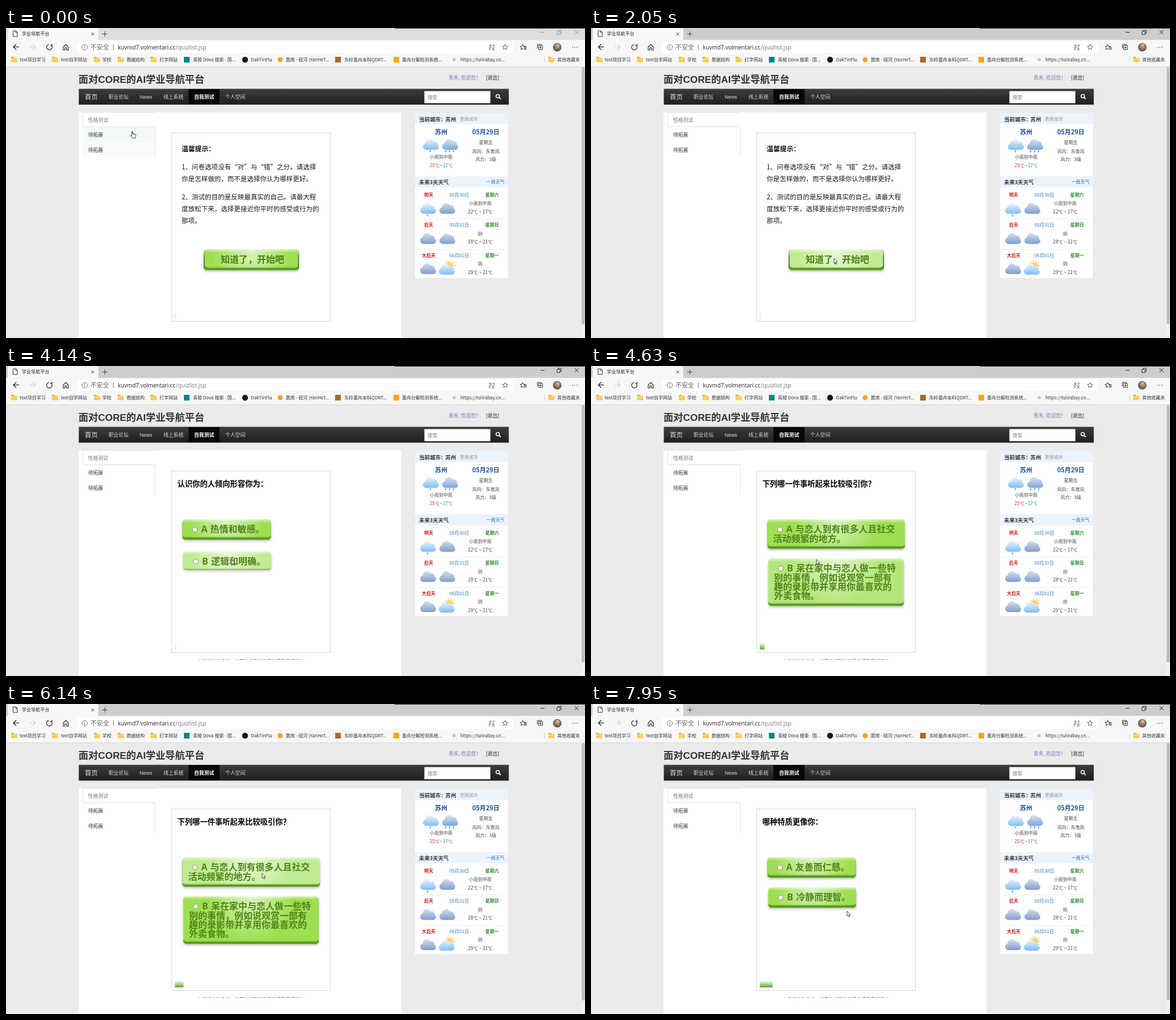
These frames come from a looping animation (1022 by 548 pixels, 7990 ms). An HTML page with a canvas:

```html
<!DOCTYPE html>
<html lang="zh-CN">
<head>
<meta charset="utf-8">
<title>学业导航平台</title>
<style>
html, body { margin: 0; width: 100%; height: 100%; overflow: hidden; background: #ebebeb; }
canvas { display: block; width: 1022px; height: 548px; }
</style>
</head>
<body>
<canvas id="stage" width="1022" height="548"></canvas>
<script>
const LOOP = 7990;
const CJK = '"Noto Sans CJK SC", sans-serif';
const UI = '"Open Sans", "Noto Sans CJK SC", sans-serif';
const ARIAL = '"Liberation Sans", "Noto Sans CJK SC", sans-serif';
const screen = document.getElementById('stage').getContext('2d');
let g = screen;

// ---- drawing helpers ----
function rect(x, y, w, h, fill) {
  g.fillStyle = fill;
  g.fillRect(x, y, w, h);
}
function frame(x, y, w, h, color) {
  g.strokeStyle = color;
  g.lineWidth = 1;
  g.strokeRect(x + .5, y + .5, w - 1, h - 1);
}
function round(x, y, w, h, r, fill) {
  g.beginPath();
  g.roundRect(x, y, w, h, r);
  g.fillStyle = fill;
  g.fill();
}
function disc(x, y, r, fill, stroke, width = 1) {
  g.beginPath();
  g.arc(x, y, r, 0, Math.PI * 2);
  if (fill) { g.fillStyle = fill; g.fill(); }
  if (stroke) { g.strokeStyle = stroke; g.lineWidth = width; g.stroke(); }
}
function path(x, y, pts, stroke, width = 1, fill) {
  g.beginPath();
  for (let i = 0; i < pts.length; i += 2) g.lineTo(x + pts[i], y + pts[i + 1]);
  if (fill) { g.closePath(); g.fillStyle = fill; g.fill(); }
  g.strokeStyle = stroke;
  g.lineWidth = width;
  g.stroke();
}
function shade(y0, y1, ...colors) {
  const grad = g.createLinearGradient(0, y0, 0, y1);
  colors.forEach((c, i) => grad.addColorStop(i / (colors.length - 1), c));
  return grad;
}
// y is the visual middle of the line
function text(s, x, y, size, color, { bold = false, align = 'left', font = CJK } = {}) {
  g.font = `${bold ? 'bold ' : ''}${size}px ${font}`;
  g.textAlign = align;
  g.fillStyle = color;
  g.fillText(s, x, y + size * .37);
}
const bold = { bold: true };
const center = { align: 'center' };
const boldCenter = { bold: true, align: 'center' };

// ---- browser window ----
function star(x, y, r, color) {
  const pts = [];
  for (let i = 0; i <= 10; i++) {
    const a = i * Math.PI / 5 - Math.PI / 2, q = i % 2 ? r * .45 : r;
    pts.push(Math.cos(a) * q, Math.sin(a) * q);
  }
  path(x, y, pts, color, .9);
}
function folder(x) {
  round(x - 5, 51, 5, 4, 1, '#d9a520');
  round(x - 5, 52.5, 11, 8, 1, '#f5cc55');
  rect(x - 5, 54.5, 11, 1, '#fbe39b');
}
function drawTabs(active) {
  rect(0, 0, 1022, 21, active ? '#cdcdcd' : '#dedede');
  rect(686, 0, 336, 1, '#222');
  round(3, 0, 160, 22, [3, 3, 0, 0], '#f7f7f7');
  path(16, 10, [-3.5, -5, 1.5, -5, 4, -2.5, 4, 5, -3.5, 5, -3.5, -5], '#333');
  path(16, 10, [1.2, -5, 1.2, -2, 4, -2], '#333');
  text('学业导航平台', 28, 10.5, 8.1, '#222');
  path(153, 10.5, [-2.5, -2.5, 2.5, 2.5], '#333');
  path(153, 10.5, [-2.5, 2.5, 2.5, -2.5], '#333');
  path(174.5, 10.5, [-4.5, 0, 4.5, 0], '#444');
  path(174.5, 10.5, [0, -4.5, 0, 4.5], '#444');

  const c = active ? '#222' : '#999';
  path(947, 7.5, [-3.5, 0, 3.5, 0], c);
  path(976, 8, [-3.5, -2, 2, -2, 2, 3.5, -3.5, 3.5, -3.5, -2], c, .9);
  path(976, 8, [-1.5, -2, -1.5, -4, 4, -4, 4, 1.5, 2, 1.5], c, .9);
  path(1007, 7.5, [-3.5, -3.5, 3.5, 3.5], c);
  path(1007, 7.5, [-3.5, 3.5, 3.5, -3.5], c);
}
function drawToolbar() {
  rect(0, 21, 1022, 47, '#f7f7f7');
  round(125, 24, 770, 20, 3, '#fff');
  for (const [x, dir, c] of [[18, 1, '#222'], [47, -1, '#d2d2d2']]) {
    path(x, 33.5, [-5 * dir, 0, 5 * dir, 0], c, 1.2);
    path(x, 33.5, [0, -5, -5 * dir, 0, 0, 5], c, 1.2);
  }
  g.beginPath();
  g.arc(76.5, 34, 4.8, -.6, 4.6);
  g.strokeStyle = '#222';
  g.lineWidth = 1.2;
  g.stroke();
  path(76.5, 34, [1.5, -3.2, 4.6, -3.2, 4.6, -6], '#222', 1.2);
  path(105.5, 34, [-4.5, -.5, 0, -5, 4.5, -.5, 4.5, 5, 1.5, 5, 1.5, 1, -1.5, 1, -1.5, 5, -4.5, 5, -4.5, -.5], '#222', 1.1);
  disc(139, 34, 4.7, null, '#666', .9);
  rect(138.5, 33, 1, 3.5, '#666');
  rect(138.5, 31, 1, 1, '#666');
  text('不安全', 149, 34, 11, '#666');
  rect(189, 29, 1, 10, '#777');
  text('kuvmd7.volmentari.cc', 197.5, 34, 9.9, '#222', { font: UI });
  text('/quizlist.jsp', 299.5, 34, 10.3, '#777', { font: UI });
  text('文', 852, 31.5, 6, '#333');
  text('a', 859, 31, 6, '#333');
  text('a', 852, 37, 6, '#333');
  text('文', 857, 37, 6, '#333');
  star(881, 34, 5, '#555');
  star(912, 34, 5, '#222');
  rect(913, 33, 6, 5, '#f7f7f7');
  for (let i = 0; i < 3; i++) rect(914, 33 + i * 2, 5, 1, '#333');
  path(942, 33, [-4, 3, -4, -4, 3, -4, 3, -2], '#333');
  path(942, 33, [-2, -2, 5, -2, 5, 5, -2, 5, -2, -2], '#333');
  path(943.5, 34.5, [-2, 0, 2, 0], '#333');
  path(943.5, 34.5, [0, -2, 0, 2], '#333');
  const skin = g.createRadialGradient(974, 30, 1, 973, 34, 8);
  skin.addColorStop(0, '#d8b79c');
  skin.addColorStop(1, '#594238');
  disc(973, 34, 7.5, skin);
  for (let i = -1; i < 2; i++) disc(1004 + i * 4, 34, .8, '#333');
}
function drawBookmarks() {
  [14, 86, 160, 202, 260, 962].forEach(folder);
  const marks = [
    [24, 'text项目学习'], [97, 'text自学网站'], [170, '学校'], [213, '数据结构'], [271, '打字网站'],
    [330, '青梭 Dova 搜索 - 国...'], [432, 'OakTinFlu'], [494, '题库 - 砚河 (YanHeT...'],
    [597, '东岭墨舟本科QDRT...'], [699, '墨舟分解检测系统...'], [802, 'https://tulirabay.cn...'], [973, '其他收藏夹']
  ];
  for (const [x, s] of marks) text(s, x, 56.5, 8, '#333');
  rect(314, 51, 10, 10, '#0c8484');
  disc(422, 56, 5.2, '#191717');
  disc(484, 56, 4.5, '#efa32c');
  rect(581, 51, 10, 10, '#a8672c');
  rect(684, 51, 10, 10, '#f6a609');
  disc(791, 56, 3, '#e5bfa0');
  rect(950, 51, 1, 10, '#ccc');
}

// ---- page ----
function drawPage() {
  rect(0, 68, 1022, 480, '#ebebeb');
  rect(0, 68, 1022, 1, '#d8d8d8');
  rect(1015, 69, 7, 479, '#f1f1f1');
  round(1016, 69, 5.5, 455, 2, '#bdbdbd');
  text('面对CORE的AI学业导航平台', 128, 91, 17.25, '#333', { bold: true, font: ARIAL });
  text('青禾, 欢迎您！', 781, 88, 8.8, '#8272b4');
  text('[退出]', 847, 88, 8.8, '#222');

  rect(128.5, 107.5, 759, 28, shade(108, 135, '#3c3c3c', '#1f1f1f'));
  rect(322, 108, 55, 27, '#080808');
  text('首页', 139, 121.5, 11.5, '#e2e2e2');
  const items = [[181, '职业论坛'], [236, 'News'], [278, '线上系统'], [387, '个人空间']];
  for (const [x, s] of items) text(s, x, 121.5, 8.8, '#ddd', { font: ARIAL });
  text('自我测试', 332, 121.5, 8.8, '#fff', bold);
  rect(738.5, 111.5, 116.5, 21.5, '#fff');
  text('搜索', 744, 122.5, 8.8, '#888');
  disc(868, 120.5, 3, null, '#fff', 1.5);
  path(870, 122.5, [0, 0, 3.2, 3.2], '#fff', 1.8);

  rect(128, 149, 570, 399, '#fff');
}
function cloud(x, y, top, bottom) {
  g.fillStyle = shade(y - 10, y + 10, top, bottom);
  g.beginPath();
  for (const [dx, dy, r] of [[-8, 3.5, 6], [-2, -2, 7.5], [6, 0, 6], [9, 4.5, 5]]) {
    g.moveTo(x + dx + r, y + dy);
    g.arc(x + dx, y + dy, r, 0, Math.PI * 2);
  }
  g.rect(x - 8, y + 1, 17, 8.5);
  g.fill();
}
const rainy = (x, y) => cloud(x, y, '#eef7fe', '#7dbbf5');
const grey = (x, y) => cloud(x, y, '#d6dfef', '#7f9bcb');
function drop(x, y) {
  g.beginPath();
  g.ellipse(x, y, 1.3, 2, .3, 0, Math.PI * 2);
  g.fillStyle = '#6fb1ea';
  g.fill();
}
function drawWeather() {
  rect(721, 149, 166, 294, '#fff');
  frame(721, 149, 166, 294, '#e6ebf1');
  rect(722, 150, 164, 20, '#edf3fb');
  rect(722, 262, 164, 20, '#edf3fb');
  text('当前城市：', 729, 161, 9.6, '#333', bold);
  text('苏州', 775.5, 161, 9.5, '#333', bold);
  text('更换城市', 801, 161, 8, '#999');
  text('苏州', 768, 184, 11, '#1a5296', boldCenter);
  text('05月29日', 847, 184, 11, '#1a5296', boldCenter);
  text('星期五', 847, 202, 8, '#444', center);
  text('风向：东南风', 847, 218, 8, '#444', center);
  text('风力：3级', 847, 232, 8, '#444', center);
  rainy(750, 206);
  cloud(784, 206, '#d8e3f1', '#7ba4d8');
  [749, 776, 783, 790].forEach(x => drop(x, 218));
  text('小雨到中雨', 768, 228.5, 8, '#444', center);
  text('25℃', 747.5, 242.5, 8.3, '#e02f2f');
  text('~', 768, 242.5, 8.3, '#444', center);
  text('17℃', 788.5, 242.5, 8.3, '#2b86cf', { align: 'right' });
  text('未来3天天气', 729, 272.5, 9.4, '#333', bold);
  text('一周天气', 848, 272.5, 8, '#1a6fbf');

  const days = [
    ['明天', '05月30日', '星期六', '小雨到中雨', '22℃ ~ 17℃'],
    ['后天', '05月31日', '星期日', '阴', '28℃ ~ 21℃'],
    ['大后天', '06月01日', '星期一', '阴', '29℃ ~ 21℃']
  ];
  days.forEach(([name, date, week, sky, temp], i) => {
    const y = 295 + i * 53.3;
    text(name, 746, y, 8, '#d01818', boldCenter);
    text(date, 800, y, 8.2, '#2a78c0', center);
    text(week, 858, y, 8, '#2b8a2b', boldCenter);
    text(sky, 837, y + 15.5, 8, '#444', center);
    text(temp, 837, y + 30, 8.3, '#444', center);
    if (i) rect(727, Math.round(y - 11), 154, 1, '#ececec');
    (i ? grey : rainy)(745, y + 24);
    if (i < 2) grey(779, y + 24);
  });
  drop(744, 331.5);
  for (let i = 0; i < 10; i++) {
    const a = i * Math.PI / 5, c = Math.cos(a), s = Math.sin(a);
    path(783, 420, [c * 7, s * 7, c * 10, s * 10], '#f8cd62', 1.5);
  }
  disc(783, 420, 6.5, '#fbd36c');
  rainy(778, 426.5);
}

// ---- quiz content ----
const questions = [
  { start: 2210, title: '认识你的人倾向形容你为：', a: ['热情和敏感。'], b: ['逻辑和明确。'] },
  { start: 4510, title: '下列哪一件事听起来比较吸引你？',
    a: ['与恋人到有很多人且社交', '活动频繁的地方。'],
    b: ['呆在家中与恋人做一些特', '别的事情，例如说观赏一部有', '趣的录影带并享用你最喜欢的', '外卖食物。'] },
  { start: 6190, title: '你倾向通过以下哪种方式收集信息：',
    a: ['你对有可能发生之事的想', '像和期望。'], b: ['你对目前状况的实际认', '知。'] },
  { start: 7700, title: '哪种特质更像你：', a: ['友善而仁慈。'], b: ['冷静而理智。'] }
];
const presses = [
  { key: 'B', from: 4100, to: 4230 },
  { key: 'A', from: 5820, to: 5950 },
  { key: 'B', from: 7330, to: 7460 }
];
const fills = [[4180, 4400], [5820, 6030], [7330, 7540]];

// time, x, y of the pointer tip
const route = [
  [40, 222, 183], [610, 300, 300], [900, 300, 300], [1680, 429, 407],
  [2620, 429, 407], [2800, 415, 362], [3060, 404, 318], [3200, 396, 308], [3240, 394, 282],
  [3400, 396, 240], [3520, 397, 224], [3690, 397, 224], [3980, 398, 342],
  [4960, 398, 342], [5400, 452, 299], [6200, 452, 299], [6560, 452, 368],
  [7740, 452, 368], [7940, 452, 366]
];
const clamp = v => Math.max(0, Math.min(1, v));
function pointer(t) {
  let i = 0;
  while (i < route.length - 2 && t > route[i + 1][0]) i++;
  const [t0, x0, y0] = route[i], [t1, x1, y1] = route[i + 1];
  const k = clamp((t - t0) / (t1 - t0));
  return [x0 + (x1 - x0) * k, y0 + (y1 - y0) * k];
}
// share of the last `span` ms that the pointer spent inside the box
function hover(t, start, x, y, w, h, span = 200) {
  let hits = 0;
  for (let i = 0; i < 20; i++) {
    const s = t - i * span / 20;
    const [px, py] = pointer(s);
    if (s >= start && px >= x && px <= x + w && py >= y && py <= y + h) hits++;
  }
  return hits / 20;
}
function button(x, y, w, h, lit, press = 0, sides = 0) {
  const mix = (a, b) => Math.round(a + (b - a) * lit);
  const face = `rgb(${mix(157, 193)},${mix(223, 235)},${mix(80, 146)})`;
  const top = y + press, fh = h - 4, cx = x + w / 2;
  g.save();
  g.shadowColor = 'rgba(0,0,0,.3)';
  g.shadowBlur = 4;
  g.shadowOffsetY = 2;
  round(x, top + 2, w, h - press - 2, 5, '#5c9c1f');
  g.restore();
  if (sides) round(x, top, w, fh, 5, shade(top, top + fh, '#c3e39a', '#3f7410', '#3f7410'));
  g.save();
  g.beginPath();
  g.roundRect(x + sides, top, w - sides * 2, fh, 5);
  g.clip();
  rect(x, top, w, fh, face);
  const r = Math.min(w * .42, 75);
  const glow = g.createRadialGradient(cx, top + 6, 0, cx, top + 6, r);
  glow.addColorStop(0, 'rgba(255,255,255,.6)');
  glow.addColorStop(1, 'rgba(255,255,255,0)');
  rect(x, top, w, fh, glow);
  rect(x, top, w, 6, shade(top, top + 6, 'rgba(255,255,255,.6)', 'rgba(255,255,255,0)'));
  rect(x, top + fh - 3, w, 3, shade(top + fh - 3, top + fh, 'rgba(80,150,20,0)', 'rgba(80,150,20,.25)'));
  g.restore();
}
function option(t, q, key, lines, x, y, w) {
  const h = 20 + lines.length * 16;
  const press = presses.some(p => p.key === key && t >= p.from && t < p.to) ? 3.5 : 0;
  button(x, y, w, h, hover(t, q.start, x, y, w, h), press);
  const ty = y + 17.5 + press;
  disc(x + 22, ty + .5, 4.3, '#fff', '#777', .9);
  text(key, x + 33, ty, 16, '#50831b', { bold: true, font: UI });
  lines.forEach((s, i) => text(s, x + (i ? 10 : 49), ty + i * 16.2, 16, '#50831b', bold));
  return y + h;
}
function progress(t, y) {
  const w = 1 + fills.reduce((sum, [a, b]) => sum + 7.2 * clamp((t - a) / (b - a)), 0);
  rect(298, y, w, 11, w < 1.5 ? '#d0d4ce' : shade(y, y + 11, '#f0f8ea', '#a5d28a', '#58a52e'));
}
function drawIntro(t) {
  frame(292, 185, 281, 334, '#d4d4d4');
  text('温馨提示：', 310, 213.5, 11.8, '#111', bold);
  const lines = [
    [246, '1、问卷选项没有“对”与“错”之分。请选择'], [267, '你是怎样做的，而不是选择你认为哪样更好。'],
    [299, '2、测试的目的是反映最真实的自己。请最大程'], [320, '度放松下来，选择更接近你平时的感受或行为的'],
    [341, '那项。']
  ];
  for (const [y, s] of lines) text(s, 310, y, 11.55, '#1a1a1a');
  button(349, 391, 168, 37, hover(t, 0, 349, 391, 168, 37, 330), 0, 1.5);
  text('知道了，开始吧', 379, 409, 16, '#4a7f15', bold);
  progress(t, 503);
}
function drawQuestion(t, q) {
  frame(292, 185, 281, 322, '#d4d4d4');
  text(q.title, 302.5, 208, 13.3, '#000', bold);
  const wide = q.a.length > 1;
  const next = option(t, q, 'A', q.a, 311.5, 271, wide ? 242.5 : 156);
  option(t, q, 'B', q.b, 313, next + 17, wide ? 239 : 155);
  progress(t, 490);
  g.save();
  g.beginPath();
  g.rect(330, 517, 210, 2.5);
  g.clip();
  text('本测试仅供参考，结果与作答时的真实感受密切相关', 432, 521.5, 8.2, '#555', center);
  g.restore();
}
function drawMenu(t) {
  const fade = 1 - clamp((t - 40) / 260);
  rect(135, 175, 129, 27, `rgba(245,248,248,${fade})`);
  rect(135, 202, 129, 26, `rgba(250,250,250,${fade})`);
  rect(135, 149, 129, 1, '#e8e8e8');
  rect(135, 150, 1, 25, '#e3e3e3');
  rect(135, 174, 129, 1, '#e3e3e3');
  rect(263, 175, 1, 53, '#e3e3e3');
  text('性格测试', 145, 162.5, 8.8, '#777');
  text('待拓展', 145, 189, 8.8, '#333');
  text('待拓展', 145, 215.5, 8.8, '#333');
}
function drawPointer(t) {
  const [x, y] = pointer(t);
  if (x < 264 && y < 228) {
    path(x, y, [0, 0, 1.8, 0, 1.8, 4, 6.8, 5.2, 7.2, 8, 6, 12, 1.4, 12, -2.5, 7.6, -1.5, 6.5, 0, 8, 0, 0], '#222', .9, '#fff');
  } else {
    path(x, y, [0, 0, 0, 9, 2, 7.2, 3.6, 10.5, 4.9, 9.9, 3.4, 6.8, 6, 6.6], '#222', .8, '#fff');
  }
}

// ---- playback ----
const backdrop = document.createElement('canvas');
backdrop.width = 1022;
backdrop.height = 548;
g = backdrop.getContext('2d');
drawToolbar();
drawBookmarks();
drawPage();
drawWeather();
g = screen;

let begin;
function tick(now) {
  begin ??= now;
  const t = (now - begin) % LOOP;
  g.drawImage(backdrop, 0, 0);
  drawTabs(t >= 40);
  drawMenu(t);
  const q = questions.filter(item => t >= item.start).pop();
  if (q) drawQuestion(t, q);
  else drawIntro(t);
  drawPointer(t);
  requestAnimationFrame(tick);
}
requestAnimationFrame(tick);
</script>
</body>
</html>
```
